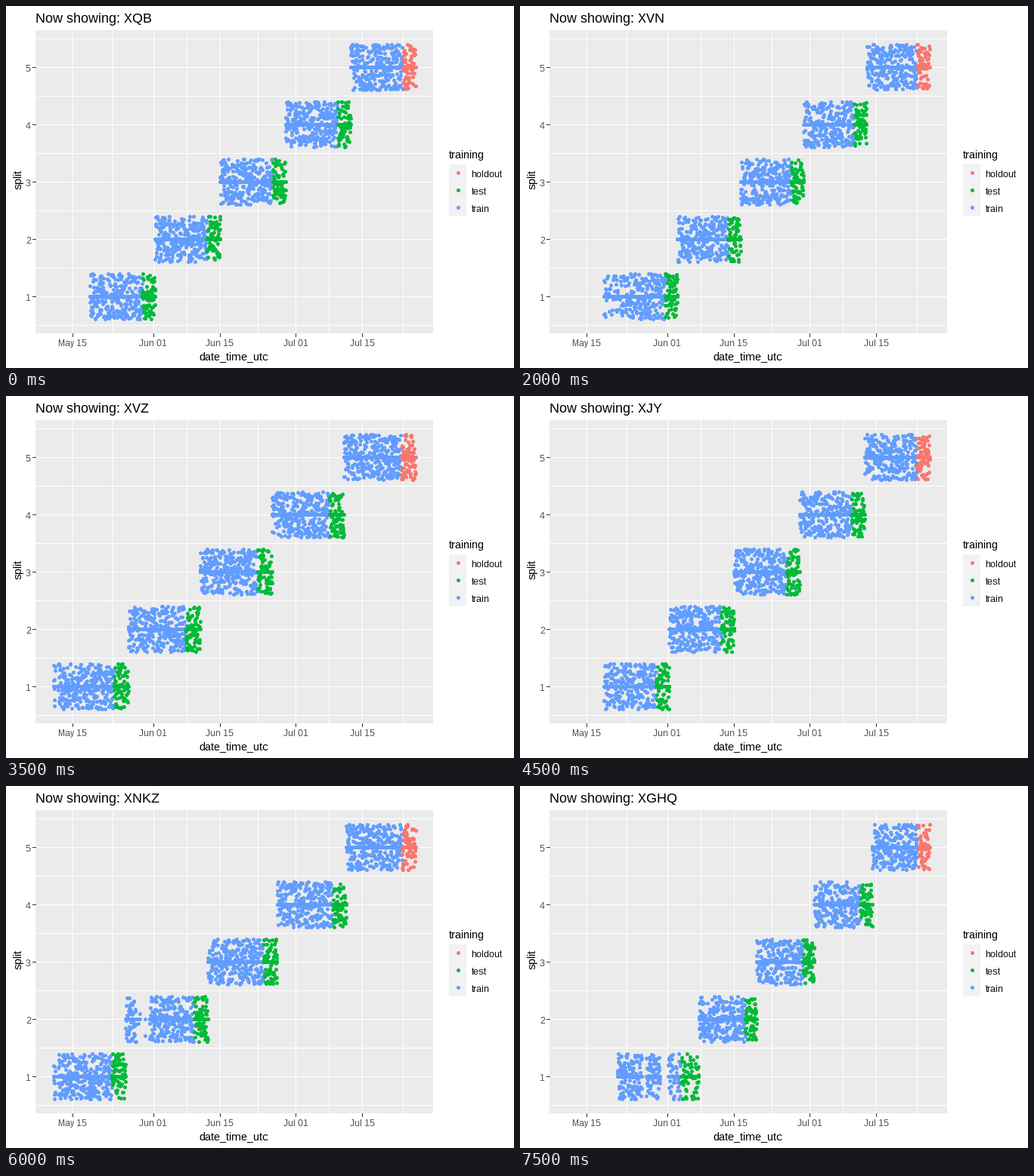
A matplotlib script that plays this animation: 672x480 px, repeating every 8 s.

```python
import numpy as np
import matplotlib.pyplot as plt
from matplotlib.animation import FuncAnimation
from matplotlib.patches import Rectangle

W, H, DPI = 672, 480, 96
PX = 72 / DPI
DAY = 6.28            # pixels per day
UNIT = 76             # pixels per split
LEFT, TOP, RIGHT, BOTTOM = 39, 32, 565, 434
END = 541.8           # last reading
COLORS = {"holdout": "#F8766D", "test": "#00BA38", "train": "#619CFF"}

plt.rcParams.update({
    "font.family": "Liberation Sans",
    "text.hinting": "native",
    "text.hinting_factor": 1,
})

NAMES = ["XQB", "XVKE", "XVN", "XVZ", "XJY", "XPIZU", "XNKZ", "XGHQ"]

# First reading, then thin stretches: from, to, share of readings kept
LATE = (111, )
FULL = (63, (65, 68.5, 0))
SETS = [
    LATE,
    LATE,
    (111, (112, 140, 0.5)),
    FULL,
    FULL,
    LATE,
    (*FULL, (172, 190, 0.06)),
    FULL,
    (129, (161, 167, 0), (185, 196, 0), (200, 235, 0.6)),
]


def row_y(split):
    return 81 + (5 - split) * UNIT


def make_points(seed, start, *thin):
    """Cut hourly readings into five equal splits, the last fifth for testing.

    Each reading is drawn once jittered and once on its split's line.
    """
    rng = np.random.default_rng(seed)
    x = np.arange(start, END, DAY / 24)
    for lo, hi, keep in thin:
        inside = (x > lo) & (x < hi)
        x = x[~inside | (rng.random(x.size) < keep)]

    index = np.arange(x.size)
    fold = index * 5 // x.size
    is_test = index * 5 / x.size - fold >= 0.8
    y = row_y(fold + 1)
    xs = np.tile(x, 2)
    ys = np.append(y + rng.uniform(-0.4, 0.4, x.size) * UNIT, y)
    masks = {"train": ~is_test,
             "test": is_test & (fold < 4),
             "holdout": is_test & (fold == 4)}
    return {kind: (xs[np.tile(m, 2)], ys[np.tile(m, 2)])
            for kind, m in masks.items()}


DATA = [make_points(seed, *s) for seed, s in enumerate(SETS)]

fig = plt.figure(figsize=(W / DPI, H / DPI), dpi=DPI, facecolor="white")
ax = fig.add_axes([0, 0, 1, 1])
ax.set(xlim=(0, W), ylim=(H, 0))
ax.axis("off")


def box(x, y, w, h, color):
    ax.add_patch(Rectangle((x, y), w, h, fc=color, lw=0, aa=False, zorder=0))


def line(xs, ys, color="white"):
    ax.plot(xs, ys, color=color, lw=PX, aa=False, zorder=1,
            solid_capstyle="butt")


def text(x, y, s, size, color="black", **kw):
    return ax.text(x, y, s, fontsize=size * PX, color=color,
                   **{"va": "baseline", **kw})


def dots(color, x=(), y=()):
    return ax.plot(x, y, "o", color=color, ms=5 * PX, mew=0, aa=False,
                   zorder=3)[0]


# Panel, grid and axes
box(LEFT, TOP, RIGHT - LEFT, BOTTOM - TOP, "#EBEBEB")
dates = {"May 15": 0, "Jun 01": 17, "Jun 15": 31, "Jul 01": 47, "Jul 15": 61}
major = 88.1 + DAY * np.array(list(dates.values()))
minor = (major + np.append(major[1:], 2 * major[1] - major[0] + major[-1]
                           - major[1])) / 2
for x in [*minor, *major]:
    line([x, x], [TOP, BOTTOM])
for y in row_y(np.arange(0.5, 6, 0.5)):
    line([LEFT, RIGHT], [y, y])

for x, label in zip(major, dates):
    line([x, x], [BOTTOM, BOTTOM + 4], "#333333")
    text(x, 451, label, 12, "#4D4D4D", ha="center")
for k in range(1, 6):
    y = row_y(k)
    line([LEFT - 4, LEFT], [y, y], "#333333")
    text(33, y + 6, str(k), 12, "#4D4D4D", ha="right")

text(301, 469, "date_time_utc", 15, ha="center")
text(24, 230, "split", 15, rotation=90, ha="right", va="center")
title = text(39, 22, "", 18)

# Legend
text(586, 202, "training", 15)
for k, (kind, color) in enumerate(COLORS.items()):
    y = 210 + 23 * k
    box(586, y, 23, 23, "#F2F2F2")
    dots(color, [598], [y + 11])
    text(615.5, y + 17, kind, 12)

layers = {kind: dots(COLORS[kind]) for kind in ("train", "test", "holdout")}


def update(i):
    title.set_text("Now showing: " + NAMES[i // 2])
    for kind, layer in layers.items():
        layer.set_data(*DATA[(i + 1) // 2][kind])
    return [title, *layers.values()]


anim = FuncAnimation(fig, update, frames=16, interval=500, repeat=True,
                     repeat_delay=0, blit=False)
plt.show()
```
